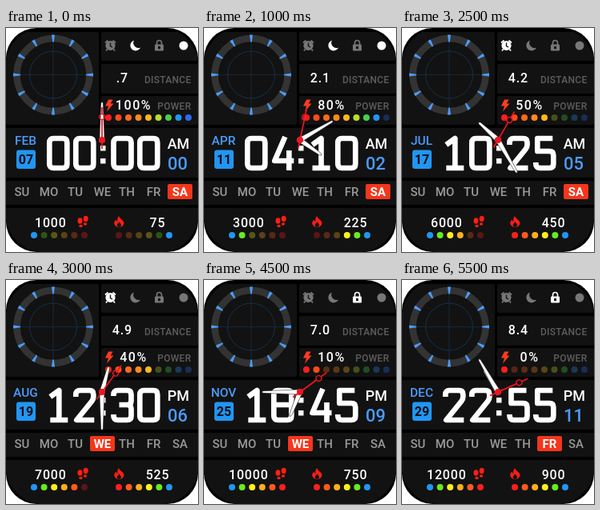
An HTML page that plays this animation: 240 px wide and 280 px high, repeating every 6000 ms.

```html
<!DOCTYPE html>
<html lang="en">
<head>
<meta charset="utf-8">
<title>Watch face</title>
<style>
html, body { margin: 0; width: 100%; height: 100%; overflow: hidden; background: #fff; }
svg { display: block; width: 240px; height: 280px; }
text { font-family: Roboto, "Open Sans", sans-serif; font-weight: 500; fill: #fff; text-anchor: middle; }
.num { font-size: 16px; letter-spacing: .8px; }
.label { font-size: 12px; fill: #5e5e5e; letter-spacing: .3px; text-anchor: end; }
.day { font-size: 15px; fill: #999; }
.blue { fill: #4a9cff; }
.big { fill: none; stroke: #fff; stroke-width: 6.7; stroke-linejoin: round; }
</style>
</head>
<body>
<svg viewBox="0 0 240 280">
  <defs><clipPath id="screen"><rect width="240" height="280" rx="46"/></clipPath></defs>
  <rect width="240" height="280" rx="38" fill="#000"/>
  <g clip-path="url(#screen)">
    <g fill="#121212">
      <rect y="5" width="116" height="116" rx="2"/>
      <rect x="119" y="5" width="121" height="36" rx="2"/>
      <rect x="119" y="45" width="121" height="37" rx="2"/>
      <rect x="119" y="85" width="121" height="36" rx="2"/>
      <rect y="125" width="240" height="62"/>
      <rect y="191" width="240" height="30"/>
      <rect y="225" width="240" height="55"/>
    </g>

    <g id="dial" transform="translate(59 58.5)" fill="none">
      <circle r="45.5" stroke="#333" stroke-width="8.5"/>
      <circle r="29.5" stroke="#14304a"/>
      <path d="M-41 0H41M0-41V41" stroke="#14283a"/>
    </g>

    <g id="alarm" fill="none" stroke="currentColor" stroke-width="1.800">
      <circle cx="130.500" cy="22" r="5.200" fill="currentColor"/>
      <path d="M124 18.500L127.500 15.500M137 18.500L133.500 15.500M126.500 26.500L125 28.500M134.500 26.500L136 28.500"/>
      <path d="M130.500 18.500V22.500L133 24" stroke="#121212" stroke-width="1.400"/>
    </g>
    <path id="moon" d="M160 15.500A6.600 6.600 0 1 0 168 24.500A6.400 6.400 0 0 1 160 15.500Z" fill="currentColor"/>
    <g id="lock" fill="currentColor">
      <rect x="186" y="20.500" width="11" height="8" rx="1.200"/>
      <path d="M188.500 21V18.500A3 3 0 0 1 194.500 18.500V21" fill="none" stroke="currentColor" stroke-width="1.600"/>
      <rect x="190" y="22.700" width="3" height="3.500" rx="1" fill="#121212"/>
    </g>
    <circle id="radio" cx="222" cy="22" r="5.500" fill="currentColor"/>

    <text id="dist" class="num" x="145.300" y="68.300"></text>
    <text class="label" x="231.500" y="69">DISTANCE</text>
    <path d="M128 89.500H133.500L130.800 94.500H134.500L126 104.500L128 97.500H124Z" fill="#ff3b1f"/>
    <text id="power" class="num" x="159.500" y="102" style="letter-spacing:1.600px"></text>
    <text class="label" x="231.500" y="102">POWER</text>

    <text id="month" class="blue" x="24.500" y="146" font-size="15.500"></text>
    <rect x="13" y="152.500" width="24" height="23.500" rx="3" fill="#2196f3"/>
    <text id="date" x="25" y="170" font-size="16" style="font-weight:700;fill:#0a0f16"></text>
    <g id="clock" class="big" role="img"></g>
    <path d="M118 147h6.500v6.500h-6.500zM118 163h6.500v6.500h-6.500z" fill="#fff"/>
    <text id="half" x="215.500" y="151" font-size="18"></text>
    <text id="sec" class="blue" x="214.500" y="176.500" font-size="22"></text>

    <rect id="mark" y="195" width="31" height="19" rx="2" fill="#f5361b"/>
    <g id="week"></g>

    <text id="steps" class="num" x="55.800" y="248.700"></text>
    <g fill="#ff1e14">
      <ellipse cx="92.500" cy="241" rx="3" ry="3.700"/><ellipse cx="93.500" cy="247.500" rx="2.200" ry="1.800"/>
      <ellipse cx="99.700" cy="238.500" rx="3" ry="3.700"/><ellipse cx="99" cy="245" rx="2.200" ry="1.800"/>
      <path d="M141 235C142 239 147.500 240 147.500 244A6.200 6 0 0 1 135.200 244C135.200 242 136.500 241 137.500 239.500C138 241 138.500 241.500 139.300 242C139 239.500 139.500 237 141 235Z"/>
    </g>
    <path d="M141.500 242C142 244 144 244.500 144 246.200A2.600 2.600 0 0 1 138.800 246.200C138.800 244.500 141 244 141.500 242Z" fill="#121212"/>
    <text id="heat" class="num" x="189.500" y="248.700"></text>
    <g id="dots"></g>

    <g transform="translate(120 140)">
      <g fill="#fff" stroke="#121212" stroke-width=".5">
        <path id="hour" d="M-3.400 3L-1.500-31L0-33L1.500-31L3.400 3Z"/>
        <path id="minute" d="M-3.200 3L-1.300-46L0-48L1.300-46L3.200 3Z"/>
      </g>
      <g id="second" stroke="#f0141e" fill="none">
        <path d="M0 11V-25.500M0-32.500V-41" stroke-width="1.700"/>
        <circle cy="-29" r="3.400" stroke-width="1.300"/>
      </g>
      <circle r="4" fill="#f0141e"/>
    </g>
  </g>
</svg>
<script>
const STEP = 500, COUNT = 12;
const MONTHS = "FEB MAR APR MAY JUN JUL AUG SEP OCT NOV DEC DEC".split(" ");
const DAYS = "SU MO TU WE TH FR SA".split(" ");
const DAY_X = [20, 53.5, 86.5, 120.5, 151, 184.5, 217.5];
const ACTIVE = [6, 1, 6, 3, 1, 6, 3, 1, 6, 3, 4, 5];
const POWER = ["#ff1e1e", "#ff4a1a", "#ff6a1a", "#ff8a1a", "#ffb81a", "#b5e02a", "#48d04a", "#2196f3", "#2a6cf0"];
const LEVEL = ["#2196f3", "#66ec22", "#fff01e", "#ffae1e", "#ff5a1e", "#ff1e1e"];

// Centre lines of the large numerals in a 22 by 37 box
const BOX = "M5 0H17Q22 0 22 5V32Q22 37 17 37H5Q0 37 0 32V5Q0 0 5 0Z";
const DIGITS = {
  0: BOX,
  1: "M1 8L12 0V37M1 37H23",
  2: "M0 8V5Q0 0 5 0H17Q22 0 22 5V8Q22 11 20 13.500L1 37H23",
  3: "M0 7V5Q0 0 5 0H17Q22 0 22 5V13Q22 18 17 18H7M17 18Q22 18 22 23V32Q22 37 17 37H5Q0 37 0 32V30",
  4: "M14 -2L1 28H25M19 15V40",
  5: "M21 0H2V16H17Q22 16 22 21V32Q22 37 17 37H5Q0 37 0 32V30",
  6: "M21 0H5Q0 0 0 5V32Q0 37 5 37H17Q22 37 22 32V21Q22 16 17 16H0",
  8: BOX + "M1 18H21"
};
const DIGIT_X = [54.3, 87.3, 134.5, 167.3];

const $ = id => document.getElementById(id);
const pad = n => String(n).padStart(2, "0");

function add(parent, tag, attrs, text) {
  const el = document.createElementNS("http://www.w3.org/2000/svg", tag);
  for (const name in attrs) el.setAttribute(name, attrs[name]);
  if (text) el.textContent = text;
  return parent.appendChild(el);
}

for (let i = 0; i < 12; i++) {
  add($("dial"), "path", { d: "M-2-50H2L.8-41H-.8Z", fill: "#4a9cff", transform: `rotate(${i * 30})` });
}
const week = DAYS.map((day, i) => add($("week"), "text", { class: "day", x: DAY_X[i], y: 210 }, day));
const numerals = DIGIT_X.map(x => add($("clock"), "path", { transform: `translate(${x} 138)` }));

function dotRow(colors, x, gap, y) {
  return colors.map((fill, i) => add($("dots"), "circle", { cx: x + i * gap, cy: y, r: 4, fill }));
}
const powerDots = dotRow(POWER, 128, 12.5, 112);
const stepDots = dotRow(LEVEL, 35, 12.6, 259);
const heatDots = dotRow(LEVEL, 204, -12.6, 259);

function light(dots, n) {
  dots.forEach((dot, i) => dot.setAttribute("opacity", i < n ? 1 : 0.3));
}
function icon(id, on) {
  $(id).style.color = on ? "#fff" : "#777";
}
function turn(id, deg) {
  $(id).setAttribute("transform", `rotate(${deg})`);
}

function draw(k) {
  const hour = 2 * k, minute = 5 * k, charge = Math.max(0, 100 - 10 * k);
  const labels = {
    dist: (0.7 * (k + 1)).toFixed(1).replace(/^0/, ""),
    power: charge + "%",
    month: MONTHS[k],
    date: pad(7 + 2 * k),
    half: hour < 12 ? "AM" : "PM",
    sec: pad(k),
    steps: 1000 * (k + 1),
    heat: 75 * (k + 1)
  };
  for (const id in labels) $(id).textContent = labels[id];

  const time = pad(hour) + pad(minute);
  numerals.forEach((el, i) => el.setAttribute("d", DIGITS[time[i]]));
  $("clock").setAttribute("aria-label", pad(hour) + ":" + pad(minute));

  $("mark").setAttribute("x", DAY_X[ACTIVE[k]] - 15.5);
  week.forEach((el, i) => {
    const on = i === ACTIVE[k];
    el.style.fill = on ? "#fff" : "";
    el.style.fontWeight = on ? 700 : "";
  });

  light(powerDots, Math.ceil(charge * 8 / 100) + 1);
  light(stepDots, Math.floor(5 * (k + 1) / 8) + 1);
  light(heatDots, k + 1);

  icon("alarm", k >= 4 && k < 8);
  icon("moon", k < 5);
  icon("lock", k >= 7);
  icon("radio", k < 5);

  turn("hour", (hour + minute / 60) * 30);
  turn("minute", minute * 6);
  turn("second", k * 6);
}

const start = performance.now();
let shown = -1;
function tick() {
  const k = Math.floor((performance.now() - start) / STEP) % COUNT;
  if (k !== shown) draw(shown = k);
  requestAnimationFrame(tick);
}
tick();
</script>
</body>
</html>
```
